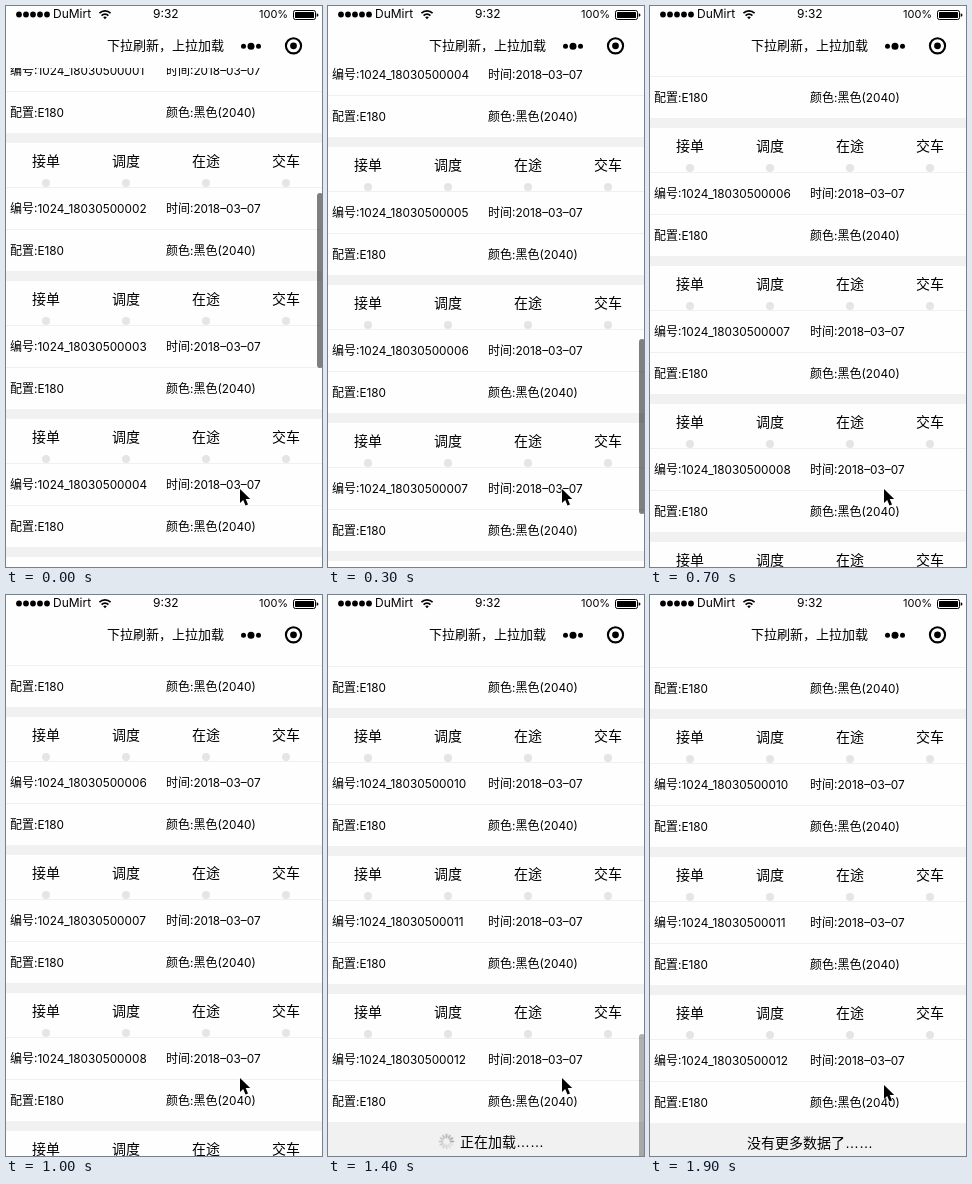
Animation of 316 by 561 pixels, one loop 2 s. Source, as an HTML page:

```html
<!DOCTYPE html>
<html lang="zh-CN">
<head>
<meta charset="utf-8">
<title>下拉刷新，上拉加载</title>
<style>
html, body { margin: 0; width: 100%; height: 100%; overflow: hidden; background: #f1f1f1; }
#stage {
  position: relative; width: 316px; height: 561px; overflow: hidden; background: #f1f1f1;
  color: #000; font: 14px/20px Inter, "Noto Sans CJK SC", "Noto Sans CJK", sans-serif;
}
#stage * { position: absolute; box-sizing: border-box; white-space: nowrap; }
#stage b { position: static; font-weight: 400; font-size: 12px; }

#list, #more, #bar, #cursor, .loading, .ended { animation: 2s step-end infinite; }
#list { left: 0; top: 0; width: 320px; animation-name: scroll; }
#more { left: 0; top: 0; width: 320px; animation-name: more; }

.card { left: 0; width: 320px; height: 128px; background: #fefefe; }
.step { top: 8px; width: 80px; text-align: center; }
.step::after {
  content: ""; position: absolute; left: 36px; top: 28px;
  width: 8px; height: 8px; border-radius: 50%; background: #e5e5e5;
}
.row { left: 0; width: 320px; height: 42px; border-top: 1px solid #f0f0f0; font-size: 11.8px; }
.row span { top: 11px; }

.loader {
  left: 0; width: 320px; height: 40px;
  font-family: "Liberation Sans", "Noto Sans CJK SC", "Noto Sans CJK", sans-serif;
}
.loader span { top: 10px; }
.loading { left: 0; top: 0; width: 320px; height: 40px; }
.loader .ended { left: 97px; visibility: hidden; }
.last .loading { animation-name: hide; }
.last .ended { animation-name: show; }
.spinner { left: 110px; top: 11px; animation: spin 1s steps(12) infinite; }

#head { left: 0; top: 0; width: 316px; height: 62px; background: #fefefe; }
#head svg { left: 0; top: 0; }
#bar {
  left: 311px; top: 0; width: 6px; border-radius: 3px; background: #000;
  animation-name: bar;
}
#cursor { left: 231.5px; top: 481px; animation-name: cursor; }

@keyframes scroll {
  0% { transform: translateY(0); }
  5% { transform: translateY(-132px); }
  10% { transform: translateY(-270px); }
  15% { transform: translateY(-410px); }
  20% { transform: translateY(-572px); }
  25% { transform: translateY(-568px); }
  30% { transform: translateY(-567px); }
  55% { transform: translateY(-850px); }
  60% { transform: translateY(-1131px); }
  65% { transform: translateY(-1121px); }
  70% { transform: translateY(-1118px); }
  75%, 100% { transform: translateY(-1117px); }
}
@keyframes bar {
  0% { transform: translateY(187px); height: 175px; opacity: .5; }
  5% { transform: translateY(234px); height: 175px; opacity: .5; }
  10% { transform: translateY(283px); height: 175px; opacity: .5; }
  15% { transform: translateY(333px); height: 175px; opacity: .5; }
  20% { transform: translateY(391px); height: 174px; opacity: .5; }
  25% { transform: translateY(390px); height: 175px; opacity: .5; }
  30% { transform: translateY(298px); height: 127px; opacity: .3; }
  35% { transform: translateY(298px); height: 127px; opacity: 0; }
  55% { transform: translateY(371px); height: 127px; opacity: .5; }
  60% { transform: translateY(443px); height: 123px; opacity: .5; }
  65% { transform: translateY(440px); height: 126px; opacity: .5; }
  70% { transform: translateY(439px); height: 127px; opacity: .3; }
  75%, 100% { transform: translateY(439px); height: 127px; opacity: 0; }
}
@keyframes more { 0% { visibility: hidden; } 30%, 100% { visibility: visible; } }
@keyframes hide { 0% { visibility: visible; } 75%, 100% { visibility: hidden; } }
@keyframes show { 0% { visibility: hidden; } 75%, 100% { visibility: visible; } }
@keyframes cursor { 0% { transform: none; } 95%, 100% { transform: translateY(7px); } }
@keyframes spin { to { transform: rotate(360deg); } }
</style>
</head>
<body>
<div id="stage">
  <div id="list"></div>
  <div id="bar"></div>
  <div id="head">
    <svg width="316" height="62">
      <g id="signal"></g>
      <g fill="none" stroke="#000" stroke-width="1.7">
        <path d="M93.4 7.2a8 8 0 0 1 11.2 0M95.6 9.6a4.8 4.8 0 0 1 6.8 0"/>
        <circle cx="287.5" cy="39.8" r="7.6" stroke-width="2.1"/>
      </g>
      <path d="M97.2 11.3a2.6 2.6 0 0 1 3.6 0L99 13.2z"/>
      <rect x="287.5" y="4.5" width="22" height="9" rx="1.8" fill="none" stroke="#000"/>
      <rect x="289" y="6" width="19" height="6" rx=".6"/>
      <path d="M310.7 7.2q1.8.4 1.8 1.8t-1.8 1.8z"/>
      <circle cx="237.5" cy="40.3" r="2.5"/>
      <circle cx="245" cy="40.3" r="3.5"/>
      <circle cx="252.5" cy="40.3" r="2.5"/>
      <circle cx="287.5" cy="39.8" r="3.4"/>
    </svg>
    <span style="left:47px;top:-2px;font-size:12px">DuMirt</span>
    <span style="left:147px;top:-2px;font-size:12px">9:32</span>
    <span style="left:253px;top:-2px;font-size:11px">100%</span>
    <span style="left:101px;top:29px;font-size:13px">下拉刷新，上拉加载</span>
  </div>
  <svg id="cursor" width="16" height="24">
    <path d="M2 2v14l3.2-3 2.3 5.4 2.5-1-2.3-5.3h4.5z" stroke="#fff" stroke-width="1.2" paint-order="stroke"/>
  </svg>
</div>
<script>
const PITCH = 138, FIRST_TOP = -1, FIRST_PAGE = 8, TOTAL = 12;
const cardTop = n => FIRST_TOP + (n - 1) * PITCH;
const repeat = (count, draw) => Array.from({ length: count }, (_, i) => draw(i)).join('');
// Chinese runs are set slightly larger than the digits beside them
const mixed = text => text.replace(/[\u4e00-\u9fff]+/g, '<b>$&</b>');

const row = (top, left, right) => `<div class="row" style="top:${top}px">
  <span style="left:4px">${mixed(left)}</span><span style="left:160px">${mixed(right)}</span></div>`;

const steps = ['接单', '调度', '在途', '交车']
  .map((name, i) => `<div class="step" style="left:${i * 80}px">${name}</div>`).join('');

const card = n => `<div class="card" style="top:${cardTop(n)}px">${steps}
  ${row(44, `编号:1024_180305000${String(n).padStart(2, '0')}`, '时间:2018–03–07')}
  ${row(86, '配置:E180', '颜色:黑色(2040)')}</div>`;

const spinner = `<svg class="spinner" width="17" height="17" viewBox="-8.5 -8.5 17 17">${repeat(12, i =>
  `<path d="M0-4V-7" stroke="hsl(0 0% ${86 - i * 2.2}%)" stroke-width="1.5" stroke-linecap="round" transform="rotate(${i * 30})"/>`)}</svg>`;

const loader = (after, kind) => `<div class="loader ${kind}" style="top:${cardTop(after) + 128}px">
  <div class="loading">${spinner}<span style="left:132px">正在加载……</span></div>
  <span class="ended">没有更多数据了……</span></div>`;

document.getElementById('list').innerHTML =
  repeat(FIRST_PAGE, i => card(i + 1)) + loader(FIRST_PAGE, '') +
  `<div id="more">${repeat(TOTAL - FIRST_PAGE, i => card(FIRST_PAGE + 1 + i))}</div>` +
  loader(TOTAL, 'last');

document.getElementById('signal').innerHTML =
  repeat(5, i => `<circle cx="${13 + i * 7}" cy="8.5" r="2.9"/>`);
</script>
</body>
</html>
```
